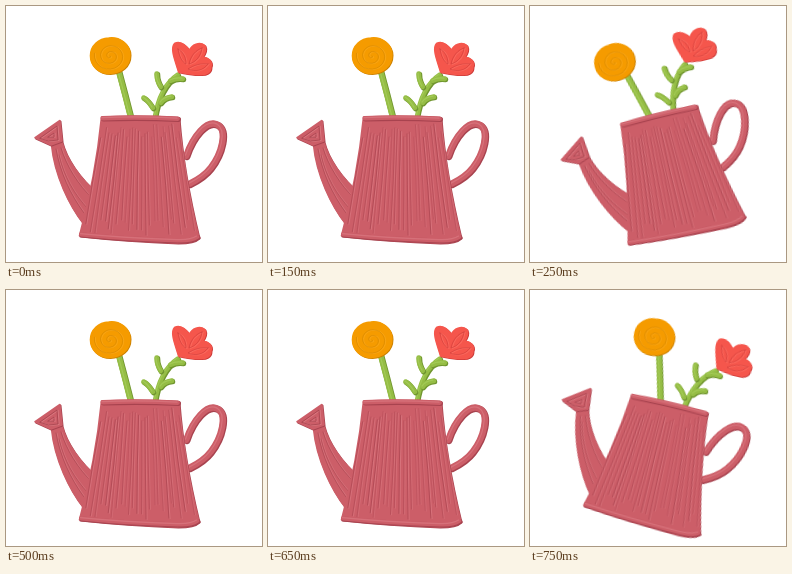
Recreate the animation shown at these times as an HTML page. Size 256 by 256 pixels, loop 1000 ms.

```html
<!DOCTYPE html>
<html lang="en">
<head>
<meta charset="utf-8">
<title>Watering can with flowers</title>
<style>
  html, body { margin: 0; width: 100%; height: 100%; overflow: hidden; background: #fff; }
  svg { display: block; width: 100vw; height: 100vh; }
  path { fill: none; stroke-linecap: round; stroke-linejoin: round; }
  #scene { transform-origin: 128px 128px; animation: rock 1s step-end infinite; }
  @keyframes rock {
    0%, 50%, 100% { transform: none; }
    25% { transform: translate(-1.4px, -1.7px) rotate(-14deg); }
    75% { transform: translate(1.8px, .5px) rotate(13deg); }
  }
</style>
</head>
<body>
<svg viewBox="0 0 256 256">
  <g id="scene"></g>
</svg>
<script>
const pink = { base: '#cc5e68', dark: '#a8434f', light: '#de7f87' };
const green = { base: '#95bd45', dark: '#70952f', light: '#abd262' };
const orange = { base: '#f59b00', dark: '#cb8000', light: '#ffb12e' };
const red = { base: '#f5564c', dark: '#cc3a38', light: '#ff7a6c' };

const scene = document.getElementById('scene');

function path(d, attrs) {
  const el = document.createElementNS('http://www.w3.org/2000/svg', 'path');
  el.setAttribute('d', d);
  for (const key in attrs) el.setAttribute(key, attrs[key]);
  scene.append(el);
}

// Thick paint: shaded lower edge, body colour, faint lit ridge.
function brush(d, width, paint) {
  path(d, { stroke: paint.dark, 'stroke-width': width, transform: 'translate(.5 .6)' });
  path(d, { stroke: paint.base, 'stroke-width': width - .6, transform: 'translate(-.3 -.3)' });
  path(d, { stroke: paint.light, 'stroke-width': 1.2, opacity: .6, transform: 'translate(-1 -.9)' });
}

function blob(d, paint) {
  const layer = (color, shift) =>
    path(d, { style: `fill:${color}`, stroke: color, 'stroke-width': 2, transform: `translate(${shift} ${shift})` });
  layer(paint.dark, .5);
  layer(paint.base, -.3);
}

function groove(d, paint, opacity = .6) {
  path(d, { stroke: paint.light, 'stroke-width': 1.1, opacity: opacity * .8, transform: 'translate(1.1 .4)' });
  path(d, { stroke: paint.dark, 'stroke-width': .9, opacity });
}

let seed = 7;
function random() {
  seed = (seed * 16807) % 2147483647;
  return seed / 2147483647;
}

// Stems and leaves
brush('M113 66 Q119 88 125 112', 6.2, green);
brush('M172 69 C160 77 152 93 149 113', 5.2, green);
for (const leaf of ['M165 75 Q170 72 177 73', 'M151 68 Q151 75 155 81',
                    'M155 97 Q158 92 166 91', 'M138 92 Q142 94 147 102']) {
  brush(leaf, 5.5, green);
}

// Round bloom with a spiral of paint
blob('M103 32.5 C114 31 124 39 124 49 C124 60 115 67.5 104 67.5 C93 67.5 85 60 85 50 C85 40 93 33 103 32.5 Z', orange);
let spiral = 'M104 50';
for (let a = .3; a < 16; a += .3) {
  const x = 104 + a * Math.cos(a);
  const y = 50 + a * .93 * Math.sin(a);
  spiral += ` L${x.toFixed(1)} ${y.toFixed(1)}`;
}
groove(spiral, orange, .5);

// Petalled bloom
blob('M173 66 C171 58 164 43 169 38 C174 35 180 40 184 45 C186 39 194 36 199 40 C201 44 199 48 196 52 C202 51 207 56 205 61 C205 67 200 69 194 68.5 C186 69 179 67 173 66 Z', red);
groove('M172 43 C176 45 180 50 180 58 C176 56 173 50 172 43 Z', red, .6);
groove('M196 42 C190 44 185 49 183 58 C190 56 195 50 196 42 Z', red, .6);
groove('M202 58 C195 57 188 59 182 63 C189 66 197 65 202 58 Z', red, .6);

// Handle
brush('M180.5 150 C187 131 201 113 212 119 C222 125 216 148 205 162 C199 170 192 174 184 178', 7, pink);

// Spout and rose
blob('M46 139 L56 136 C60 152 73 172 92 188 L78 218 C64 200 49 170 46 139 Z', pink);
groove('M50 143 C54 166 64 188 78 207', pink, .7);
groove('M55 142 C60 159 72 179 87 193', pink, .7);
groove('M53 149 C58 171 69 189 82 203', pink, .6);
blob('M29.5 132 L54 115 L56 135 L45 139 Z', pink);
groove('M34 132 L51 120 L52 134 L43 135 Z', pink, .9);
groove('M42 131 L48 127 L48 131 Z', pink, .8);

// Body
blob('M96 111.5 Q134 110 173 112 Q177 166 193 232 Q188 237 172 237 Q120 235 74 230 Q90 172 96 111.5 Z', pink);

// Vertical bristle marks that spread with the flare of the body
for (let i = 0; i < 26; i++) {
  const t = (i + .5 + (random() - .5) * .7) / 26;
  const at = v => (97 - 20 * v + t * (75 + 38 * v)).toFixed(1);
  const top = random() * .15;
  const end = .85 + random() * .15;
  const y = v => (116 + 114 * v).toFixed(1);
  const mid = (top + end) / 2;
  const bend = (+at(mid) + (random() - .5) * 3).toFixed(1);
  groove(`M${at(top)} ${y(top)} Q${bend} ${y(mid)} ${at(end)} ${y(end)}`, pink, .3 + random() * .5);
}

// Rim and base
brush('M97 112.5 Q134 111 172 113', 5, pink);
brush('M75.5 228.5 Q120 233 172 234.5 Q186 235 191.5 231', 5, pink);
</script>
</body>
</html>
```
